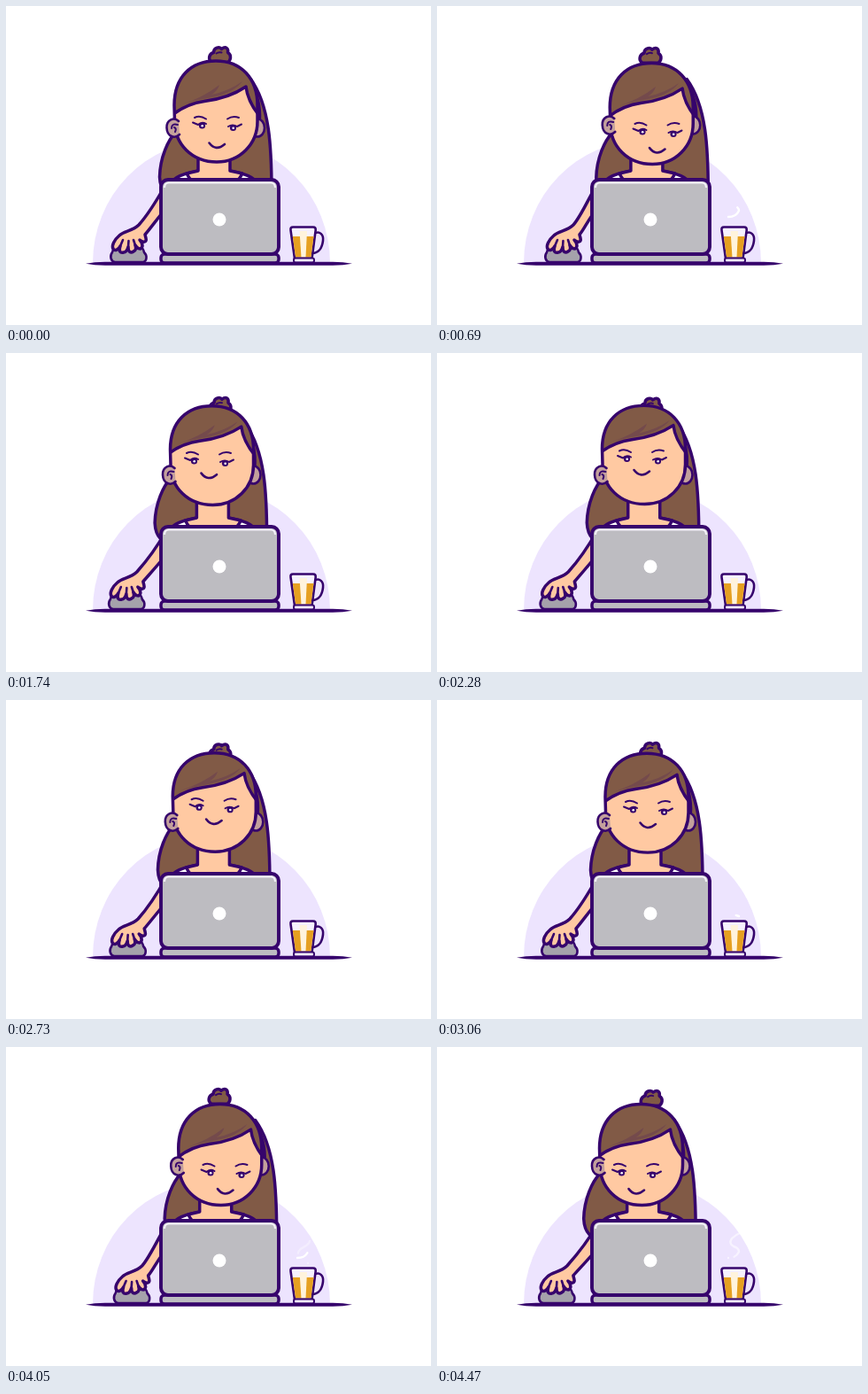
Recreate the animation shown at these times as an HTML page. Size 480 by 360 pixels, loop 4.5 s.

```html
<!DOCTYPE html>
<html lang="en">
<head>
<meta charset="utf-8">
<title>Woman working at a laptop</title>
<style>
html, body { margin: 0; width: 100%; height: 100%; overflow: hidden; background: #fff; }
svg { display: block; width: 100%; height: 100%; }
.line { stroke: #36046c; stroke-width: 3.5; stroke-linecap: round; stroke-linejoin: round; }
.mid { stroke-width: 2.6; }
.thin { stroke-width: 2; }
.none { fill: none; }
.skin { fill: #ffc9a2; }
.ear { fill: #c3a09c; }
.hair { fill: #815a46; }
.lock { fill: #744a4c; }
.shirt { fill: #fff; }
.metal { fill: #bdbcc1; }
.ink { fill: #36046c; }
</style>
</head>
<body>
<svg viewBox="0 0 480 360">
  <defs>
    <path id="skull" d="M190 112C190 80 209 62 237 62C266 62 284 82 284 112V130C284 156 264 176 238 176C210 176 190.500 156 190.500 130Z"/>
    <clipPath id="inSkull"><use href="#skull"/></clipPath>
  </defs>
  <path d="M98 290A134 138 0 0 1 366 290Z" fill="#ede4fe"/>

  <g id="backHair">
    <path class="hair line" d="M192 142C183 151 174 171 173.500 193Q174 205 180 211H300C300 160 298 112 276 82Z"/>
    <path class="ink" d="M276 84Q290 104 288 130L280 134Z"/>
  </g>

  <g id="torso">
    <path class="shirt line" d="M183 207C186 195 195 190 217 186H253C275 190 284 195 287 207Z"/>
    <path class="skin line" d="M217 166V186L204 189Q209 200 222 204H249Q262 200 267 189L253 186V166Z"/>
  </g>

  <path id="mouse" class="line mid" fill="#a5a2ab" d="M123 289C118 288 117 282 120 278C122 270 132 268 139 268C149 268 155 272 156 278C160 282 159 288 155 289Z"/>
  <path id="arm" class="skin line"/>
  <path id="fingers" class="line mid none"/>

  <g id="bun">
    <path class="hair line" d="M232 63C227 60 229 53 234 52C234 46 241 45 243 48C248 44 251 48 250 52C255 55 253 61 250 63Z"/>
    <path class="line thin none" d="M237 53Q240 51 243 52"/>
  </g>

  <ellipse id="farEar" class="ear line mid" cx="284" cy="137.500" rx="8" ry="10"/>

  <g id="head">
    <use href="#skull" class="skin"/>
    <g clip-path="url(#inSkull)">
      <g id="fringe">
        <path class="hair line" d="M184 126Q202 110.500 224 107.500Q252 104 271 91Q273 108 287 125L300 90V30H170V126Z"/>
        <path class="lock" d="M199 111Q223 103 241 89Q239 96 232 100Q252 96 267 85Q257 99 228 104Q211 107 199 111Z"/>
      </g>
    </g>
    <use href="#skull" class="line none"/>
  </g>

  <g id="nearEar">
    <path class="ear" d="M195 130C190 125 181 128 181.500 137.500C182 148 191 150 196 145Z"/>
    <path class="line mid none" d="M195 130C190 125 181 128 181.500 137.500C182 148 191 150 196 145"/>
    <path class="line thin none" d="M194 134Q187 132 187 138M190 137Q193 138 191 142"/>
  </g>

  <g id="eyes">
    <path class="line thin none" d="M213 126Q219 123 226 127.500M250 127.500Q256 123.500 263 126M211 131.500L217 134Q221 130 226 133M251 136Q256 133 261 136L266 133.500"/>
    <circle class="ink" cx="221.500" cy="135" r="3.600"/>
    <circle class="ink" cx="256.500" cy="137.500" r="3.600"/>
    <circle cx="221.700" cy="135.300" r="1.300" fill="#fff"/>
    <circle cx="256.700" cy="137.800" r="1.300" fill="#fff"/>
  </g>
  <path id="mouth" class="line mid none" d="M229.500 154.500Q237 164.500 247 156"/>

  <rect class="metal line" x="175" y="280" width="133" height="10" rx="4"/>
  <rect class="metal line" style="stroke-width:3.900" x="175" y="196" width="133" height="84" rx="8"/>
  <path d="M179 205Q179 199.500 184 199.500H299Q304 199.500 304 205" fill="none" stroke="#f3f1f8" stroke-width="2.200"/>
  <circle cx="241" cy="241" r="7.500" fill="#fff"/>

  <g fill="none" stroke="#fff" stroke-width="2.400" stroke-linecap="round">
    <path id="curl" pathLength="100" d="M341 244C333 242 327 236 331 230C334 225 342 225 343 219"/>
    <path id="wave" pathLength="100" d="M329 238Q338 238 341 231Q341 227 335 225Q329 222 333 216Q337 212 344 209"/>
  </g>

  <path class="line mid none" d="M348 257C354 253 359 258 358 265C357 273 353 279 346 279"/>
  <path class="line mid" fill="#f6f1ff" d="M324 249.500H347Q350 249.500 349.700 253L345.500 285H326L321.500 253Q321 249.500 324 249.500Z"/>
  <path fill="#e6a021" d="M323.800 260H347.500L344.500 283.500H327Z"/>
  <path fill="#fff3dc" d="M331.500 254H340L338.500 283.500H333.500Z"/>
  <rect class="line thin" x="325" y="284.500" width="23" height="5" rx="2" fill="#f1eafd"/>

  <path class="ink" d="M90 290.700Q100 289 112 288.800H369Q381 289 391 290.700Q381 292.500 369 292.700H112Q100 292.500 90 290.700Z"/>
</svg>
<script>
const LOOP = 4500, STEP = 30;
const $ = id => document.getElementById(id);

// [time, turn, nod]
const keys = [
  [0, 0, 0], [360, 7, 4], [690, 10.5, 7], [1170, -13, 7], [1740, -9, -13],
  [2280, -7, -15.5], [3060, 0, -11], [3660, 7, 4], [3990, 10.5, 7], [4470, -13, 7]
];

const slope = (i, c) => (keys[i + 1][c] - keys[i][c]) / (keys[i + 1][0] - keys[i][0]);

// Tangent that never overshoots its key
function tangent(i, c) {
  if (i === 0) return slope(0, c);
  if (i === keys.length - 1) return 0;
  const a = slope(i - 1, c), b = slope(i, c);
  return a * b <= 0 ? 0 : 2 * a * b / (a + b);
}

function track(t, c) {
  let i = 0;
  while (i < keys.length - 2 && t > keys[i + 1][0]) i++;
  const span = keys[i + 1][0] - keys[i][0];
  const s = Math.min(1, (t - keys[i][0]) / span), r = 1 - s;
  return r * r * (1 + 2 * s) * keys[i][c] + s * s * (3 - 2 * s) * keys[i + 1][c]
    + span * s * r * (r * tangent(i, c) - s * tangent(i + 1, c));
}

const shift = (x, y) => `translate(${x.toFixed(2)} ${y.toFixed(2)})`;
const move = (id, x, y, more = "") => $(id).setAttribute("transform", shift(x, y) + more);

function drawArm(m) {
  const x = n => (n + m).toFixed(2);
  $("arm").setAttribute("d",
    `M180 202C170 220 ${x(158)} 238 ${x(150)} 247C${x(143)} 254 ${x(133)} 254 ${x(128)} 259` +
    `C${x(122)} 264 ${x(119)} 271 ${x(121)} 274C${x(123)} 277 ${x(127)} 275 ${x(129)} 271` +
    `C${x(127)} 277 ${x(129)} 279 ${x(133)} 278C${x(136)} 278 ${x(137)} 275 ${x(138)} 272` +
    `C${x(138)} 278 ${x(141)} 279 ${x(144)} 277C${x(147)} 276 ${x(147)} 273 ${x(146)} 270` +
    `C${x(149)} 275 ${x(153)} 275 ${x(154)} 271Q${x(154)} 267 ${x(151)} 264` +
    `C${x(156)} 268 ${x(159)} 266 ${x(158)} 262L${x(157)} 258C${x(163)} 251 171 240 184 224Z`);
  $("fingers").setAttribute("d",
    `M${x(129)} 271L${x(132)} 264M${x(138)} 272L${x(138.5)} 265M${x(146)} 270L${x(144)} 264`);
}

// k runs from 0 to 1: the stroke grows from below, then leaves at the top
function drawWisp(id, k) {
  const el = $(id), on = k > 0 && k < 1;
  el.style.display = on ? "" : "none";
  if (!on) return;
  const from = 100 * Math.max(0, 3 * k - 2), to = Math.min(100, 150 * k);
  el.setAttribute("opacity", Math.min(1, 2 * (1 - k)).toFixed(2));
  el.setAttribute("stroke-dasharray", `0 ${from.toFixed(2)} ${Math.max(0.1, to - from).toFixed(2)} 200`);
}

function draw(t) {
  const u = track(t, 1), v = track(t, 2);
  const up = Math.min(v, 0), down = Math.max(v, 0);
  move("backHair", 0.6 * u, 0.1 * v);
  move("torso", 0.18 * u, 0);
  move("bun", 0.5 - 0.05 * u, 0.5 + 0.014 * v * v + 0.15 * Math.max(-u, 0));
  move("nearEar", 0.5 * u, -0.43 * down);
  move("farEar", 0.5 * u, -0.43 * down);
  // looking up shortens the head towards the chin
  move("head", 0.5 * u, 176 + 0.35 * v, `scale(1 ${1 + 0.0016 * up}) translate(0 -176)`);
  move("fringe", 0.08 * u, 0.4 * up - 0.05 * down);
  move("eyes", u, v);
  move("mouth", u, 1.45 * up + 0.8 * down);
  const m = u > 0 ? 0.38 * u : 0.24 * u;
  move("mouse", m, 0);
  drawArm(m);
  drawWisp("curl", (t - 2980) / 1300);
  drawWisp("wave", t < 2000 ? (t - 400) / 1100 : (t - 3900) / 800);
}

function tick() {
  draw(Math.floor(performance.now() % LOOP / STEP) * STEP);
  requestAnimationFrame(tick);
}
tick();
</script>
</body>
</html>
```
